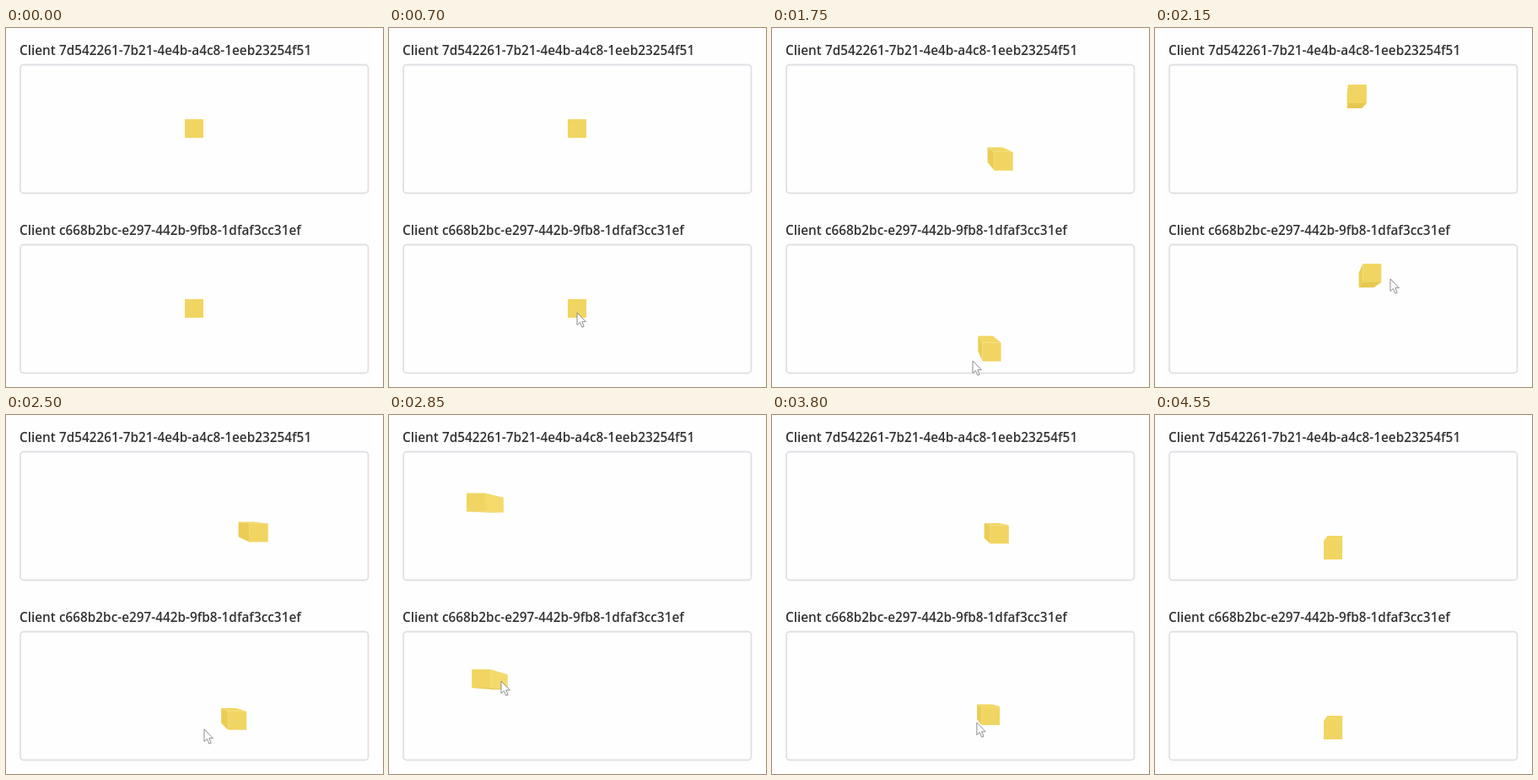
Animation, 447 px wide and 425 px high, one loop 4.6 s. Source, as an HTML page:

```html
<!DOCTYPE html>
<html lang="en">
<head>
<meta charset="utf-8">
<title>Shared cube</title>
<style>
  html, body { margin: 0; width: 100%; height: 100%; overflow: hidden; background: #fefefe; }
  svg { display: block; width: 447px; height: 425px; }
  text { font: 600 15.35px "Open Sans", "Noto Sans", sans-serif; fill: #333; }
  .frame { fill: none; stroke: #e0e1e5; stroke-width: 1.8; }
</style>
</head>
<body>
<svg viewBox="0 0 447 425">
  <text x="16" y="32">Client 7d542261-7b21-4e4b-a4c8-1eeb23254f51</text>
  <rect class="frame" x="17" y="43.5" width="412.5" height="152" rx="4"/>
  <text x="16" y="245">Client c668b2bc-e297-442b-9fb8-1dfaf3cc31ef</text>
  <rect class="frame" x="17" y="256.5" width="412.5" height="152" rx="4"/>
  <g id="upper"></g>
  <g id="lower"></g>
  <path id="cursor" d="M0 0V14.6L3.4 11.5L5.9 17.2L8.2 16.2L5.8 10.7H10.4Z"
        fill="#fff" stroke="#808080" stroke-width="0.9" stroke-linejoin="round"/>
</svg>
<script>
const LOOP = 4600, STEP = 50;
const HALF = 11, DEPTH = 0.8, CENTER_X = 223, PANEL_GAP = 213;
const GRAB = 1000, RELEASE = 3950;
const LOWER_LAG = 60, UPPER_LAG = 100;
const COLORS = { left: "#ebcd55", right: "#f3da6b", top: "#f1d763", bottom: "#e7c84e", front: "#f1d562" };

// Turning points of the hand-drawn circles: time, x, y
const turns = [
  [300, 236, 455], [600, 223, 337], [GRAB, 223, 337],
  [1150, 188, 312], [1350, 225, 297], [1600, 282, 360], [1750, 238, 394],
  [1900, 190, 317], [2150, 279, 297], [2350, 318, 345], [2500, 235, 372],
  [2740, 105, 323], [2850, 133, 315], [3350, 279, 323], [3550, 300, 350],
  [RELEASE, 211, 378], [4300, 202, 455]
];

function slope(i, k) {
  const a = turns[i - 1], b = turns[i], c = turns[i + 1];
  if (!a || !c || a[k] === b[k] || b[k] === c[k]) return 0;
  return (c[k] - a[k]) / (c[0] - a[0]);
}

// Smooth curve through the turning points
function pointer(t) {
  const last = turns.length - 1;
  t = Math.min(Math.max(t, turns[0][0]), turns[last][0]);
  let i = 0;
  while (i < last - 1 && t > turns[i + 1][0]) i++;
  const a = turns[i], b = turns[i + 1], d = b[0] - a[0];
  const u = (t - a[0]) / d, v = 1 - u;
  return [1, 2].map(k =>
    v * v * (a[k] * (1 + 2 * u) + slope(i, k) * d * u) +
    u * u * (b[k] * (1 + 2 * v) - slope(i + 1, k) * d * v));
}

const NS = "http://www.w3.org/2000/svg";

function makeCube(id, centerY) {
  const faces = {};
  for (const name in COLORS) {
    const face = document.createElementNS(NS, "polygon");
    face.setAttribute("fill", COLORS[name]);
    document.getElementById(id).appendChild(face);
    faces[name] = face;
  }
  const back = ([x, y]) => [CENTER_X + (x - CENTER_X) * DEPTH, centerY + (y - centerY) * DEPTH];
  const draw = (name, points, shown = true) =>
    faces[name].setAttribute("points", shown ? points.join(" ") : "");

  return (x, y) => {
    const l = x - HALF, r = x + HALF, t = y - HALF, b = y + HALF;
    const tl = [l, t], tr = [r, t], br = [r, b], bl = [l, b];
    const side = (name, p, q, shown) => draw(name, [p, q, back(q), back(p)], shown);
    side("left", tl, bl, l > CENTER_X);
    side("right", tr, br, r < CENTER_X);
    side("top", tl, tr, t > centerY);
    side("bottom", bl, br, b < centerY);
    draw("front", [tl, tr, br, bl]);
  };
}

const upper = makeCube("upper", 119.3);
const lower = makeCube("lower", 119.3 + PANEL_GAP);
const cursor = document.getElementById("cursor");

function cubeAt(t) {
  const [x, y] = pointer(Math.min(Math.max(t, GRAB), RELEASE));
  return [x, y - 5];
}

function render(t) {
  const [x, y] = cubeAt(t - UPPER_LAG);
  upper(x, y - PANEL_GAP);
  lower(...cubeAt(t - LOWER_LAG));
  cursor.setAttribute("transform", `translate(${pointer(t)})`);
}

const start = performance.now();
function tick() {
  const t = (performance.now() - start) % LOOP;
  render(Math.floor(t / STEP) * STEP);
  requestAnimationFrame(tick);
}
tick();
</script>
</body>
</html>
```
